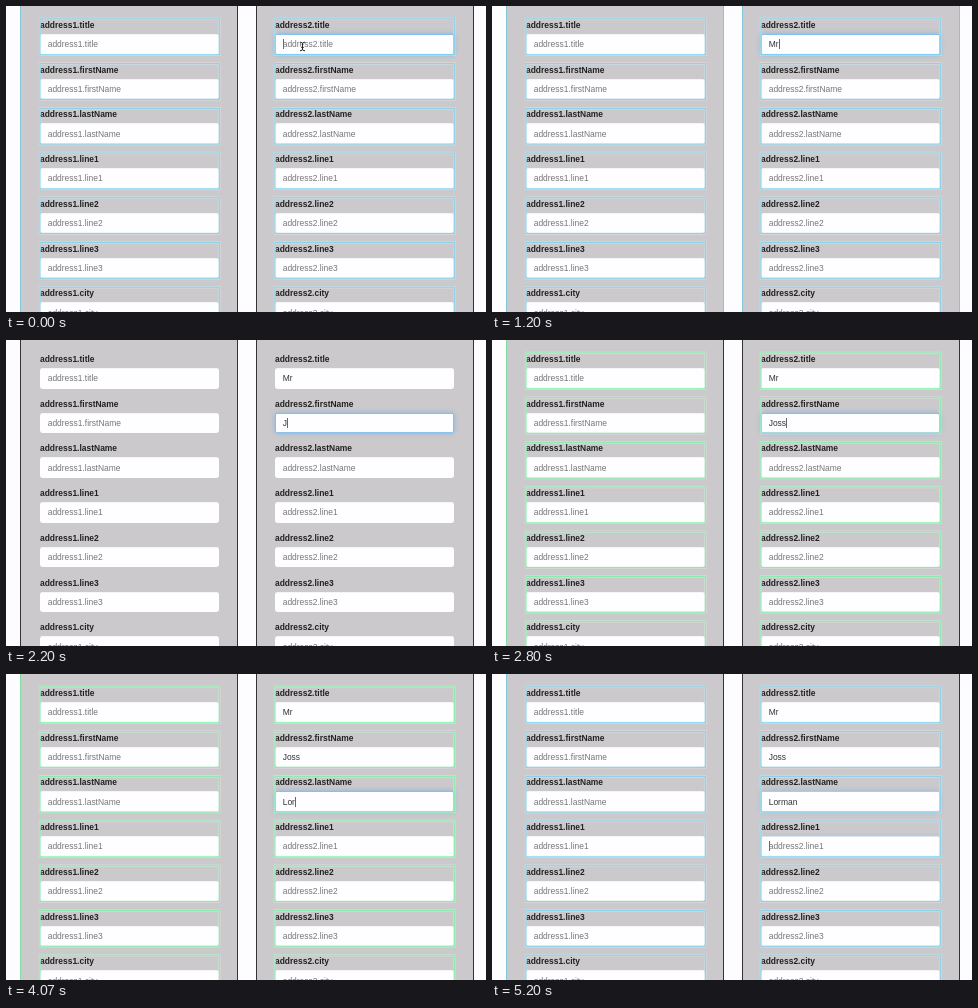
An HTML page for the animation above (5.27 s loop, 480 px wide and 306 px high).

```html
<!DOCTYPE html>
<html lang="en">
<head>
<meta charset="utf-8">
<title>Address forms</title>
<style>
  html, body { margin: 0; width: 100%; height: 100%; overflow: hidden; background: #fdfcfe; }
  #stage {
    position: relative; width: 480px; height: 306px; overflow: hidden;
    font: 8.46px/12px "Liberation Sans", Arial, sans-serif; color: #333;
    --hit: #55cef6;
    --edge: color-mix(in srgb, var(--hit) 55%, #bbb);
  }
  .panel {
    position: absolute; top: -4px; width: 218px; height: 320px; box-sizing: border-box;
    background: #cbc9cb; border: solid #333; border-width: 0 1px;
  }
  .lit .panel.first { border-left-color: var(--edge); }
  .lit.full .panel { border-color: var(--edge); }
  .group { position: absolute; width: 179.3px; height: 36px; }
  .label { position: absolute; top: 0; left: 0; font-weight: bold; color: #222; white-space: pre; }
  .input {
    position: absolute; top: 15.1px; left: 0; width: 179.3px; height: 20.6px;
    box-sizing: border-box; padding-left: 7.7px;
    display: flex; align-items: center; white-space: pre;
    background: #fefdff; border-radius: 2.4px;
    box-shadow: inset 0 .6px .6px rgba(0, 0, 0, .075);
  }
  .ring {
    position: absolute; inset: 0; border-radius: 2.4px; opacity: 0;
    box-shadow: inset 0 0 0 .8px #66afe9, 0 0 4.8px rgba(102, 175, 233, .75);
  }
  .hint { color: #777; }
  .caret { width: 1px; height: 10px; margin-right: -1px; background: #666; visibility: hidden; }
  svg { position: absolute; fill: none; }
  #flashes { inset: 0; width: 480px; height: 306px; visibility: hidden; stroke-width: 1.2; }
  .lit #flashes { visibility: visible; }
  .pale { stroke: #f0f0f0; stroke-opacity: .5; }
  .tint { stroke: var(--hit); stroke-opacity: .6; }
  #pointer { left: 292px; top: 35px; }
</style>
</head>
<body>
<div id="stage"></div>
<script>
const LOOP = 5270, FADE = 150, PITCH = 44.72, TOP = 12.9;
const NAMES = ['title', 'firstName', 'lastName', 'line1', 'line2', 'line3', 'city'];
const CYAN = '#55cef6', GREEN = '#55f98e';

// Focus interval, typed text and key times of each field in the second form
const SCRIPT = [
  { from: -200, to: 1560, text: 'Mr', keys: [870, 1130] },
  { from: 1560, to: 3100, text: 'Joss', keys: [1930, 2400, 2670, 2800] },
  { from: 3100, to: 5150, text: 'Lorman', keys: [3400, 3670, 3870, 4200, 4330, 4470] },
  { from: 5150, to: 9999, text: '', keys: [] }
];

// Update highlights: start, end, colour, whole panel
const FLASHES = [
  [0, 130, CYAN], [870, 1070, CYAN, true], [1130, 1330, CYAN, true],
  [1470, 1800, CYAN, true], [1930, 2200, CYAN], [2400, 2530, CYAN],
  [2670, 2800, CYAN], [2800, 2930, GREEN], [3070, 3270, CYAN],
  [3400, 3530, CYAN], [3670, 3870, CYAN], [3870, 4130, GREEN],
  [4200, 4330, CYAN], [4330, 4670, GREEN], [5070, LOOP, CYAN]
];
const CARET_OFF = [[200, 730], [4900, 5150]];

const stage = document.getElementById('stage');

function add(parent, cls, text = '') {
  const el = document.createElement('div');
  el.className = cls;
  el.textContent = text;
  parent.append(el);
  return el;
}

function buildForm(panelX, x, prefix, cls) {
  add(stage, 'panel ' + cls).style.left = panelX + 'px';
  return NAMES.map((name, i) => {
    const key = prefix + '.' + name;
    const group = add(stage, 'group');
    group.style.left = x + 'px';
    group.style.top = TOP + PITCH * i + 'px';
    add(group, 'label', key);
    const input = add(group, 'input');
    return {
      key,
      ring: add(input, 'ring'),
      value: add(input, 'value'),
      caret: add(input, 'caret'),
      hint: add(input, 'hint', key)
    };
  });
}

// Soft outline: pale line outside and inside, tinted line between
function outline(x, y) {
  const rect = (cls, d) => `<rect class="${cls}" x="${x - d}" y="${y - d}"
    width="${179.3 + 2 * d}" height="${35.7 + 2 * d}"/>`;
  return rect('pale', .6) + rect('pale', -.6) + rect('tint', 0);
}

buildForm(14, 34, 'address1', 'first');
const fields = buildForm(250, 269, 'address2', 'second');

const boxes = NAMES.map((_, i) => outline(34, TOP + PITCH * i) + outline(269, TOP + PITCH * i));
const beam = 'M2 1.2Q4.5 1.2 4.5 2.8Q4.5 1.2 7 1.2M4.5 2.5V8.5M2 9.8Q4.5 9.8 4.5 8.2Q4.5 9.8 7 9.8M3.3 6.5H5.7';
stage.insertAdjacentHTML('beforeend', `
  <svg id="flashes">${boxes.join('')}</svg>
  <svg id="pointer" width="9" height="11">
    <path d="${beam}" stroke="#fff" stroke-width="1.8"/>
    <path d="${beam}" stroke="#222"/>
  </svg>`);
const pointer = document.getElementById('pointer');

const within = (t, [a, b]) => t >= a && t < b;
const ease = p => { p = Math.min(1, Math.max(0, p)); return p * p * (3 - 2 * p); };

function draw(t) {
  const blink = !CARET_OFF.some(span => within(t, span));
  SCRIPT.forEach(({ from, to, text, keys }, i) => {
    const f = fields[i];
    const typed = text.slice(0, keys.filter(k => k <= t).length);
    f.value.textContent = typed;
    f.hint.textContent = typed ? '' : f.key;
    f.caret.style.visibility = blink && within(t, [from, to]) ? 'visible' : 'hidden';
    f.ring.style.opacity = ease((t - from) / FADE) - ease((t - to) / FADE);
  });

  const flash = FLASHES.find(span => within(t, span));
  stage.classList.toggle('lit', !!flash);
  stage.classList.toggle('full', !!flash && !!flash[3]);
  if (flash) stage.style.setProperty('--hit', flash[2]);
  pointer.style.visibility = t < 730 ? 'visible' : 'hidden';
}

const start = performance.now();
function tick() {
  draw((performance.now() - start) % LOOP);
  requestAnimationFrame(tick);
}
tick();
</script>
</body>
</html>
```
